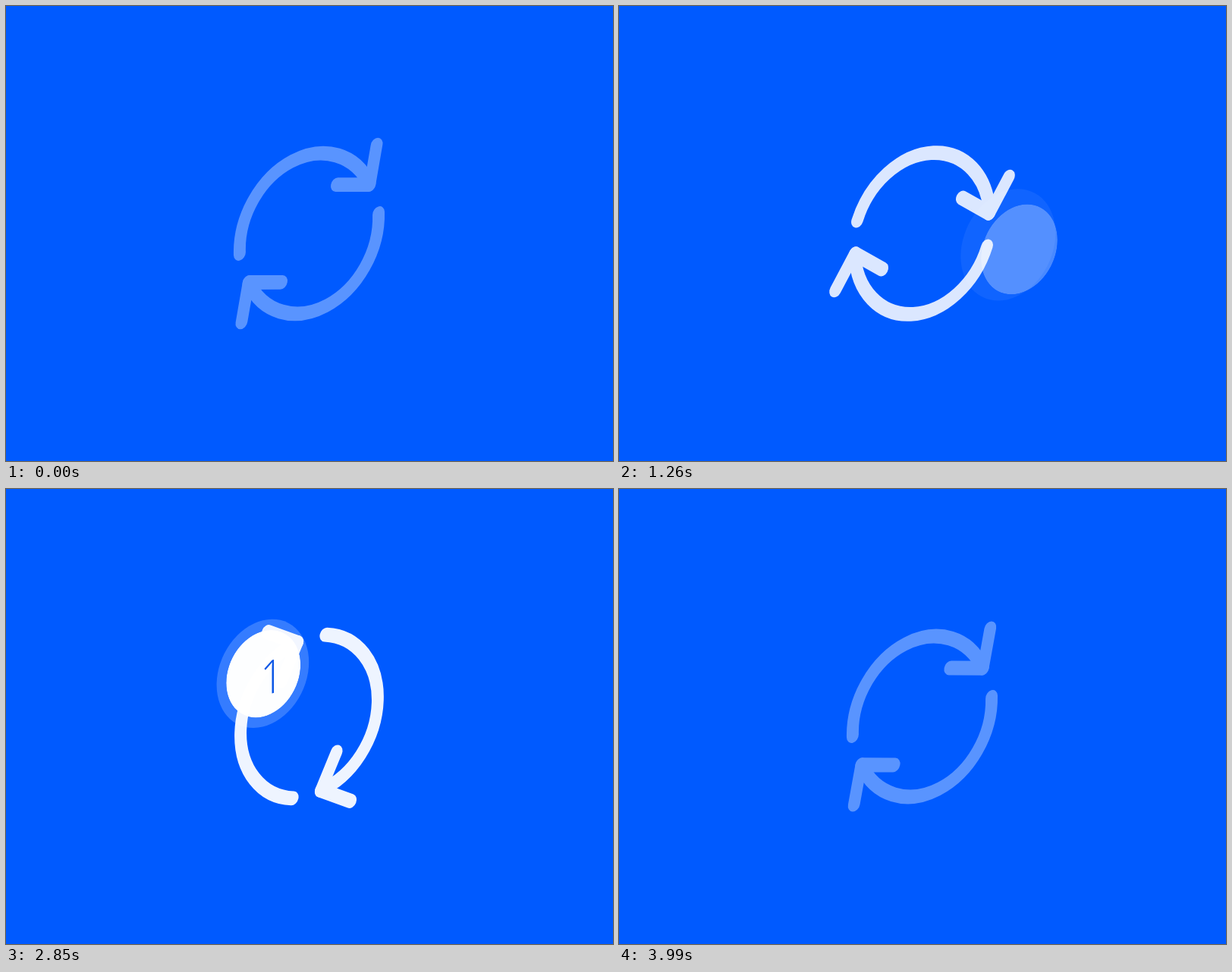
These frames come from a looping animation (800x600 px, 4050 ms). An HTML page:

```html
<!DOCTYPE html>
<html lang="en">
<head>
<meta charset="utf-8">
<title>Refresh counter</title>
<style>
  html, body { margin: 0; width: 100%; height: 100%; overflow: hidden; background: #005aff; }
  svg { display: block; width: 800px; height: 600px; }
  .icon { fill: none; stroke: #fff; stroke-width: 18.8; stroke-linecap: round; stroke-linejoin: round; }
  text { font: 300 63px "Open Sans", "Noto Sans", sans-serif; fill: #0653e6; text-anchor: middle; }
</style>
</head>
<body>
<svg viewBox="0 0 800 600">
  <defs>
    <g id="arrow">
      <path d="M-104.8 26.1A106.4 106.4 0 0 1 82.9 -64.2"/>
      <path d="M82.9 -116.6V-64.2H30.5"/>
    </g>
    <clipPath id="disc"><circle r="57.7"/></clipPath>
  </defs>
  <g transform="matrix(.848 -.208 0 .978 399.5 300)">
    <g id="icon" class="icon">
      <use href="#arrow"/>
      <use href="#arrow" transform="rotate(180)"/>
    </g>
  </g>
  <circle id="ring" r="71.7" fill="#fff"/>
  <g id="badge" clip-path="url(#disc)">
    <circle id="face" r="57.7" fill="#fff"/>
    <g id="shift"><text id="digit" x="3" y="23.3">1</text></g>
  </g>
</svg>
<script>
  const LOOP = 4050, STEP = 30, TRAVEL = 315, SLOPE = 0.41;
  const $ = id => document.getElementById(id);
  const icon = $("icon"), ring = $("ring"), badge = $("badge");
  const face = $("face"), shift = $("shift"), digit = $("digit");

  // [start, duration] of the way in and the way out
  const spinTimes = [[182, 1680], [2478, 1550]];
  const ringTimes = [[843, 912], [2815, 790]];
  const faceTimes = [[865, 910], [2802, 790]];
  const digitTimes = [[1060, 690], [2737, 790]];

  // cubic Bézier easing (.49, 0, .47, 1)
  function ease(x) {
    if (x <= 0) return 0;
    if (x >= 1) return 1;
    let lo = 0, hi = 1;
    for (let i = 0; i < 30; i++) {
      const s = (lo + hi) / 2, r = 1 - s;
      const v = 3 * 0.49 * s * r * r + 3 * 0.47 * s * s * r + s * s * s;
      if (v < x) lo = s; else hi = s;
    }
    return lo * lo * (3 - 2 * lo);
  }

  const phase = (t, [start, length]) => ease((t - start) / length);
  const presence = (t, [enter, leave]) => phase(t, enter) - phase(t, leave);
  const fade = (p, power = 1.35) => Math.pow(Math.max(p, 0), power);
  const offset = p => TRAVEL * (1 - p);

  function place(el, p) {
    const d = offset(p), k = 1 + 0.05 * (1 - p);
    const m = [0.848 * k, -0.208 * k, 0, 0.978 * k, 337.5 + d, 243 + SLOPE * d];
    el.setAttribute("transform", `matrix(${m.join(" ")})`);
  }

  function draw(t) {
    const spin = presence(t, spinTimes);
    icon.setAttribute("transform", `rotate(${11.8 + 720 * spin})`);
    icon.setAttribute("opacity", 0.35 + 0.65 * spin);

    const r = presence(t, ringTimes), f = presence(t, faceTimes), n = presence(t, digitTimes);
    place(ring, r);
    ring.setAttribute("opacity", 0.21 * fade(r, 1.5));
    place(badge, f);
    face.setAttribute("opacity", fade(f));

    // the digit moves on its own; convert the screen gap to disc coordinates
    const gap = offset(n) - offset(f);
    const u = gap / 0.848, v = (SLOPE * gap + 0.208 * u) / 0.978;
    shift.setAttribute("transform", `translate(${u} ${v})`);
    digit.setAttribute("opacity", fade(n, 0.8));
  }

  const begin = performance.now();
  function tick() {
    const t = (performance.now() - begin) % LOOP;
    draw(Math.floor(t / STEP) * STEP);
    requestAnimationFrame(tick);
  }
  tick();
</script>
</body>
</html>
```
